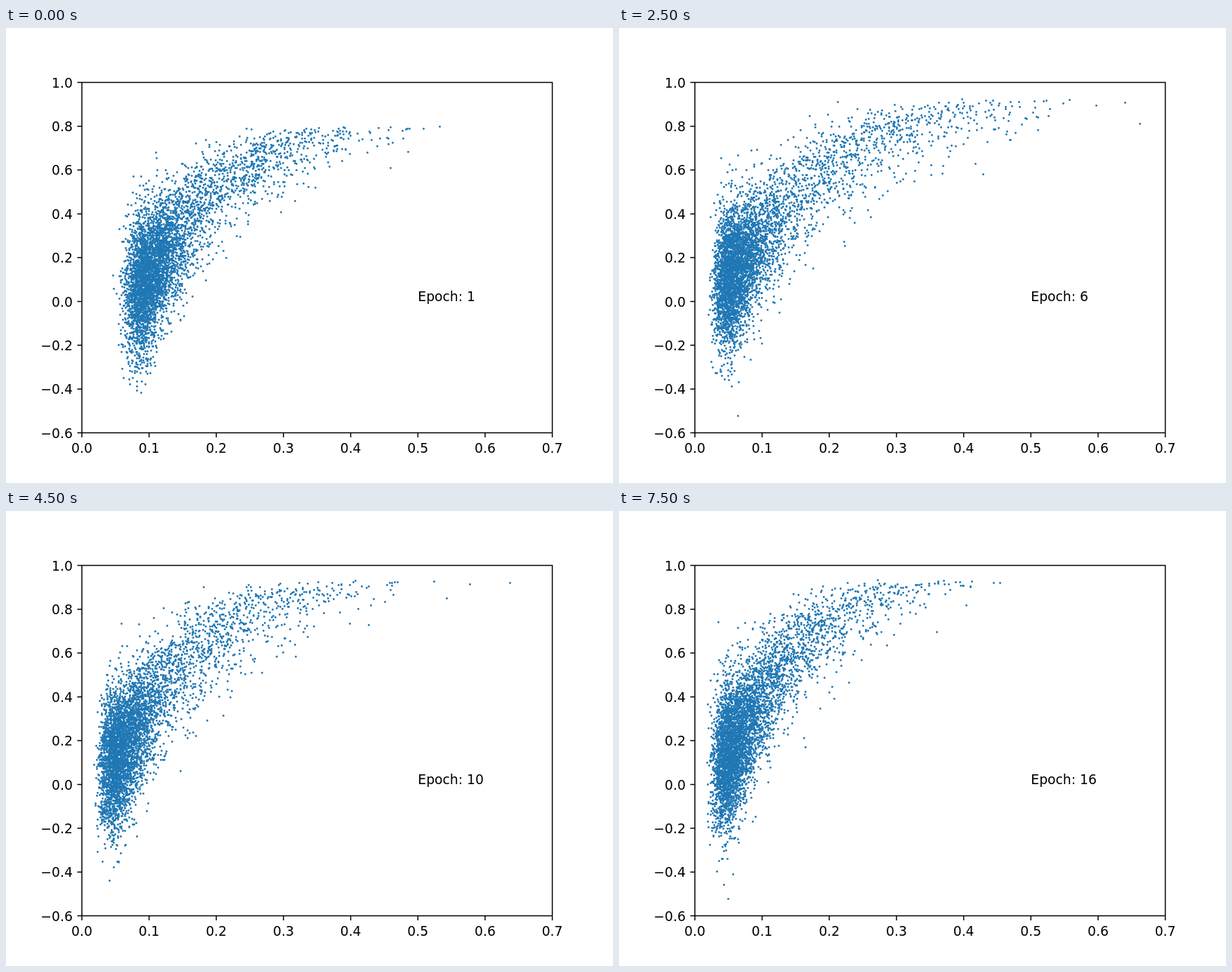
These frames come from a looping animation (864 by 648 pixels, 8 s). An HTML page with a canvas:

```html
<!DOCTYPE html>
<html lang="en">
<head>
<meta charset="utf-8">
<title>Scatter by epoch</title>
<style>
  html, body { margin: 0; width: 100%; height: 100%; overflow: hidden; background: #fff; }
  canvas, svg { position: absolute; left: 0; top: 0; display: block; }
  text { font: 18.75px "DejaVu Sans", sans-serif; fill: #000; }
  path { fill: none; stroke: #000; stroke-width: 1.5; }
</style>
</head>
<body>
<canvas id="plot" width="864" height="648"></canvas>
<svg id="axes" width="864" height="648" viewBox="0 0 864 648"></svg>
<script>
const STEP = 500, EPOCHS = 16, POINTS = 5000, TAIL_SHARE = 0.26, RADIUS = 1.45;
const BOX = { left: 108, right: 777.6, top: 77.6, bottom: 576.5 };
const px = x => BOX.left + (BOX.right - BOX.left) * x / 0.7;
const py = y => BOX.top + (BOX.bottom - BOX.top) * (1 - y) / 1.6;

// The cloud settles early on, and its tail is longest around epoch 6.
function shapeAt(epoch) {
  const settle = rate => Math.exp(-rate * (epoch - 1));
  const swell = Math.exp(-(((epoch - 6) / 4.5) ** 2));
  const tail = 0.115 + 0.055 * swell;
  return {
    tail,
    bend: 0.9 * tail,
    median: 0.058 + 0.042 * settle(0.75),
    spread: 0.34 - 0.14 * settle(0.35),
    ceiling: 0.93 - 0.13 * settle(0.55),
    base: 0.1 + 0.003 * epoch
  };
}

function makeRandom(seed) {
  return () => {
    seed = (seed + 0x6D2B79F5) | 0;
    let t = Math.imul(seed ^ (seed >>> 15), 1 | seed);
    t = (t + Math.imul(t ^ (t >>> 7), 61 | t)) ^ t;
    return ((t ^ (t >>> 14)) >>> 0) / 4294967296;
  };
}

function makeCloud(epoch) {
  const { tail, bend, median, spread, ceiling, base } = shapeAt(epoch);
  const random = makeRandom(epoch * 7919);
  const normal = () =>
    Math.sqrt(-2 * Math.log(1 - random())) * Math.cos(2 * Math.PI * random());
  const points = [];
  while (points.length < POINTS) {
    const inTail = random() < TAIL_SHARE;
    const n = normal();
    const core = median * Math.exp(spread * n * (n > 0 ? 1.2 : 1));
    const x = core + (inTail ? Math.abs(normal()) * tail : 0);
    // Each point climbs towards the ceiling at its own rate.
    let t = (x - median) / (bend * Math.exp(0.32 * normal()));
    if (t < 0) t *= 0.3;
    else if (!inTail) t *= 0.75;
    const mean = ceiling - (ceiling - base) * Math.exp(-t);
    const y = mean + 0.157 * Math.exp(-0.8 * Math.max(t, 0)) * normal();
    if (x > 0.018 && y < ceiling + 0.02) points.push([x, y]);
  }
  return points;
}

const svg = document.getElementById("axes");
function add(tag, attrs, content = "") {
  const el = document.createElementNS("http://www.w3.org/2000/svg", tag);
  for (const key in attrs) el.setAttribute(key, attrs[key]);
  el.textContent = content;
  return svg.appendChild(el);
}

function drawAxes() {
  const { left, right, top, bottom } = BOX;
  let d = `M${left} ${top}H${right}V${bottom}H${left}Z`;
  for (let i = 0; i <= 7; i++) {
    const x = px(i / 10);
    d += `M${x} ${bottom}v6.56`;
    add("text", { x, y: 604.8, "text-anchor": "middle" }, (i / 10).toFixed(1));
  }
  for (let i = -3; i <= 5; i++) {
    const y = py(i / 5);
    d += `M${left} ${y}h-6.56`;
    add("text", { x: 94.9, y: y + 7.1, "text-anchor": "end" },
      (i / 5).toFixed(1).replace("-", "\u2212"));
  }
  add("path", { d });
}

drawAxes();
const label = add("text", { x: px(0.5), y: py(0) });
const ctx = document.getElementById("plot").getContext("2d");
const clouds = Array.from({ length: EPOCHS }, (_, i) => makeCloud(i + 1));
let shown = 0;

function draw(epoch) {
  ctx.clearRect(0, 0, 864, 648);
  ctx.fillStyle = "#1f77b4";
  ctx.beginPath();
  for (const [x, y] of clouds[epoch - 1]) {
    const cx = Math.floor(px(x)) + 0.5, cy = Math.floor(py(y)) + 0.5;
    ctx.moveTo(cx + RADIUS, cy);
    ctx.arc(cx, cy, RADIUS, 0, 2 * Math.PI);
  }
  ctx.fill();
  label.textContent = "Epoch: " + epoch;
}

function tick() {
  const epoch = Math.floor(performance.now() / STEP) % EPOCHS + 1;
  if (epoch !== shown) draw(shown = epoch);
  requestAnimationFrame(tick);
}
tick();
</script>
</body>
</html>
```
